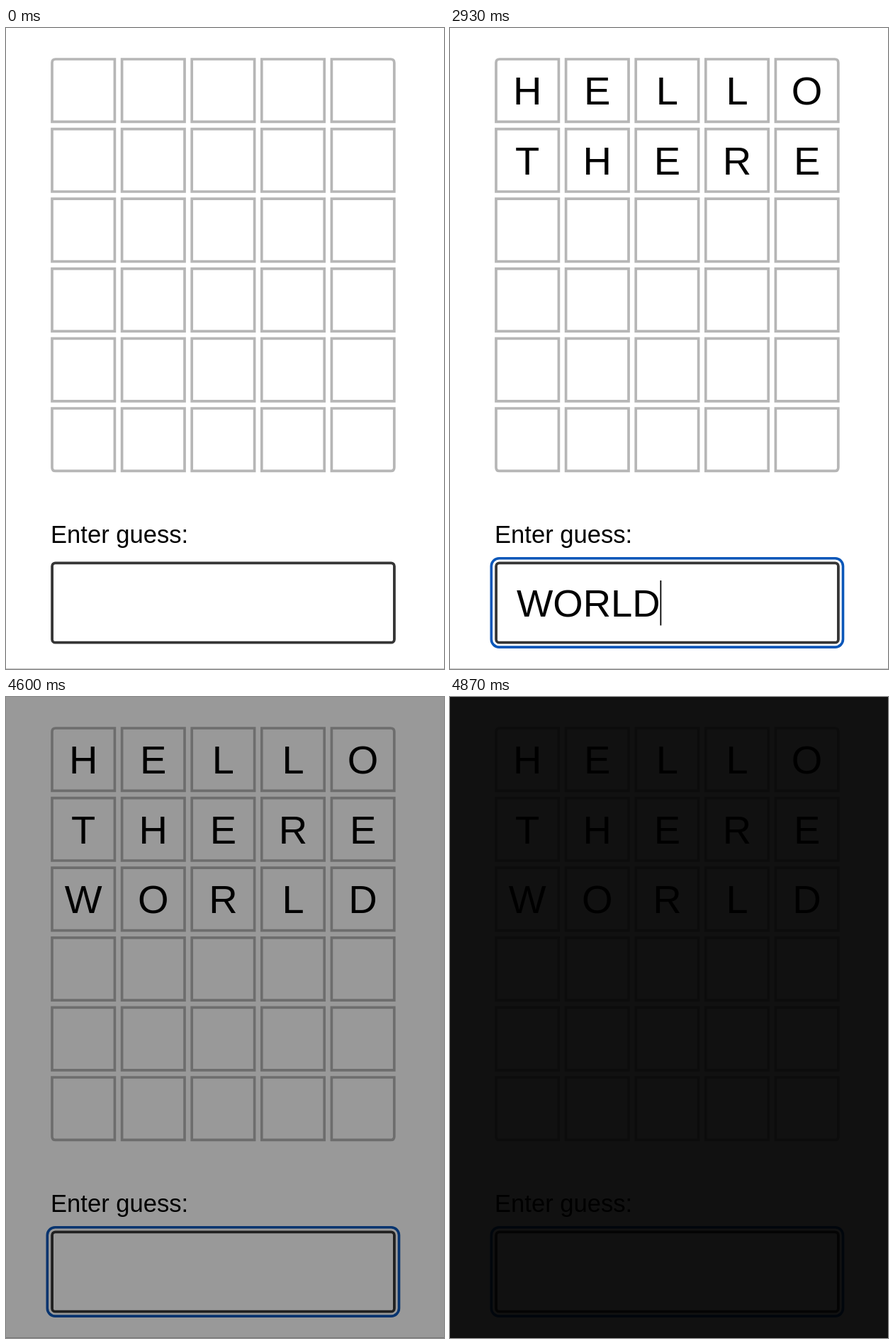
Animation, 618 px wide and 905 px high, one loop 4930 ms. Source, as an HTML page:

```html
<!DOCTYPE html>
<html lang="en">
<head>
<meta charset="utf-8">
<title>Word guess</title>
<style>
  html, body { margin: 0; width: 100%; height: 100%; overflow: hidden; background: #fff; }
  svg { display: block; width: 618px; height: 905px; }
  text { font-family: "Liberation Sans", Arial, Helvetica, sans-serif; white-space: pre; }
  #grid text { font-size: 56px; text-anchor: middle; }
  #grid path { fill: none; stroke: #b6b6b6; stroke-width: 3.7; }
</style>
</head>
<body>
<svg viewBox="0 0 618 905">
  <rect width="618" height="905" fill="#fff"/>
  <rect y="904" width="618" height="1" fill="#c6c6c6"/>
  <g id="grid"></g>
  <text x="63" y="727" font-size="34.6">Enter guess:</text>
  <rect id="ring" x="58.3" y="748.7" width="496.2" height="125.4" rx="11" fill="none" stroke="#0b57b9" stroke-width="3.6"/>
  <rect x="65.1" y="755.3" width="482.8" height="112.4" rx="4.5" fill="none" stroke="#353535" stroke-width="3.8"/>
  <text id="entry" x="94" y="831" font-size="54.4"></text>
  <rect id="caret" y="780" width="1.8" height="63.5"/>
  <path id="arrow" d="M0 0V31L7 24.5L12 36L17 34L12 22.5H22Z" stroke="#fff" stroke-width="2"/>
  <path id="beam" d="M-6-13Q0-13 0-9Q0-13 6-13M0-9V9M-6 13Q0 13 0 9Q0 13 6 13M-3 5H3" fill="none" stroke="#000" stroke-width="2"/>
  <rect id="shade" width="618" height="905"/>
</svg>
<script>
const LOOP = 4930, PITCH = 98.6;
const $ = id => document.getElementById(id);
const show = (id, on) => $(id).style.display = on ? '' : 'none';

// Key times per letter, then when the row fills and the entry clears.
const guesses = [
  { word: 'HELLO', keys: [930, 1070, 1200, 1330, 1400], fill: 1670, clear: 1670 },
  { word: 'THERE', keys: [1870, 1930, 2070, 2130, 2200], fill: 2400, clear: 2400 },
  { word: 'WORLD', keys: [2530, 2670, 2730, 2870, 2930], fill: 3400, clear: 3470 }
];

function add(name, attrs, text = '') {
  const el = document.createElementNS('http://www.w3.org/2000/svg', name);
  for (const key in attrs) el.setAttribute(key, attrs[key]);
  el.textContent = text;
  return $('grid').appendChild(el);
}

// A square whose corners are rounded only at the outside of the grid.
function cellPath(col, row) {
  const s = 88.4, R = 5;
  const left = col === 0, right = col === 4, top = row === 0, bottom = row === 5;
  const tl = top && left ? R : 0, tr = top && right ? R : 0;
  const br = bottom && right ? R : 0, bl = bottom && left ? R : 0;
  return `M${65 + col * PITCH} ${44 + row * PITCH}m${tl} 0h${s - tl - tr}q${tr} 0 ${tr} ${tr}` +
    `v${s - tr - br}q0 ${br} ${-br} ${br}h${-(s - br - bl)}q${-bl} 0 ${-bl} ${-bl}` +
    `v${-(s - bl - tl)}q0 ${-tl} ${tl} ${-tl}z`;
}

for (let row = 0; row < 6; row++)
  for (let col = 0; col < 5; col++) add('path', { d: cellPath(col, row) });

guesses.forEach((guess, row) => {
  guess.letters = [...guess.word].map((letter, col) =>
    add('text', { x: 109.2 + col * PITCH, y: 108 + row * PITCH }, letter));
});

function drawPointer(t, frame) {
  const p = 1 - (1 - Math.min(1, (frame - 1) / 4)) ** 2;
  const x = 33 + 121 * p, y = 885 - 54 * p;
  const visible = frame >= 1 && t < 930, inside = y < 869;
  show('arrow', visible && !inside);
  show('beam', visible && inside);
  for (const id of ['arrow', 'beam']) $(id).setAttribute('transform', `translate(${x} ${y})`);
}

function draw(t) {
  const frame = Math.floor((t + 3.4) * 0.015);
  let typed = '';
  for (const { word, keys, fill, clear, letters } of guesses) {
    if (t < clear) typed += word.slice(0, keys.filter(k => t >= k).length);
    for (const letter of letters) letter.style.display = t >= fill ? '' : 'none';
  }
  const entry = $('entry');
  entry.textContent = typed;
  $('caret').setAttribute('x', 94 + (typed ? entry.getComputedTextLength() : 0));
  show('ring', t >= 470);
  show('caret', t >= 470 && t < 4000);
  drawPointer(t, frame);
  $('shade').setAttribute('opacity', Math.max(0, (frame - 66) * 2 / 15));
}

const start = performance.now();
function tick() {
  draw((performance.now() - start) % LOOP);
  requestAnimationFrame(tick);
}
tick();
</script>
</body>
</html>
```
